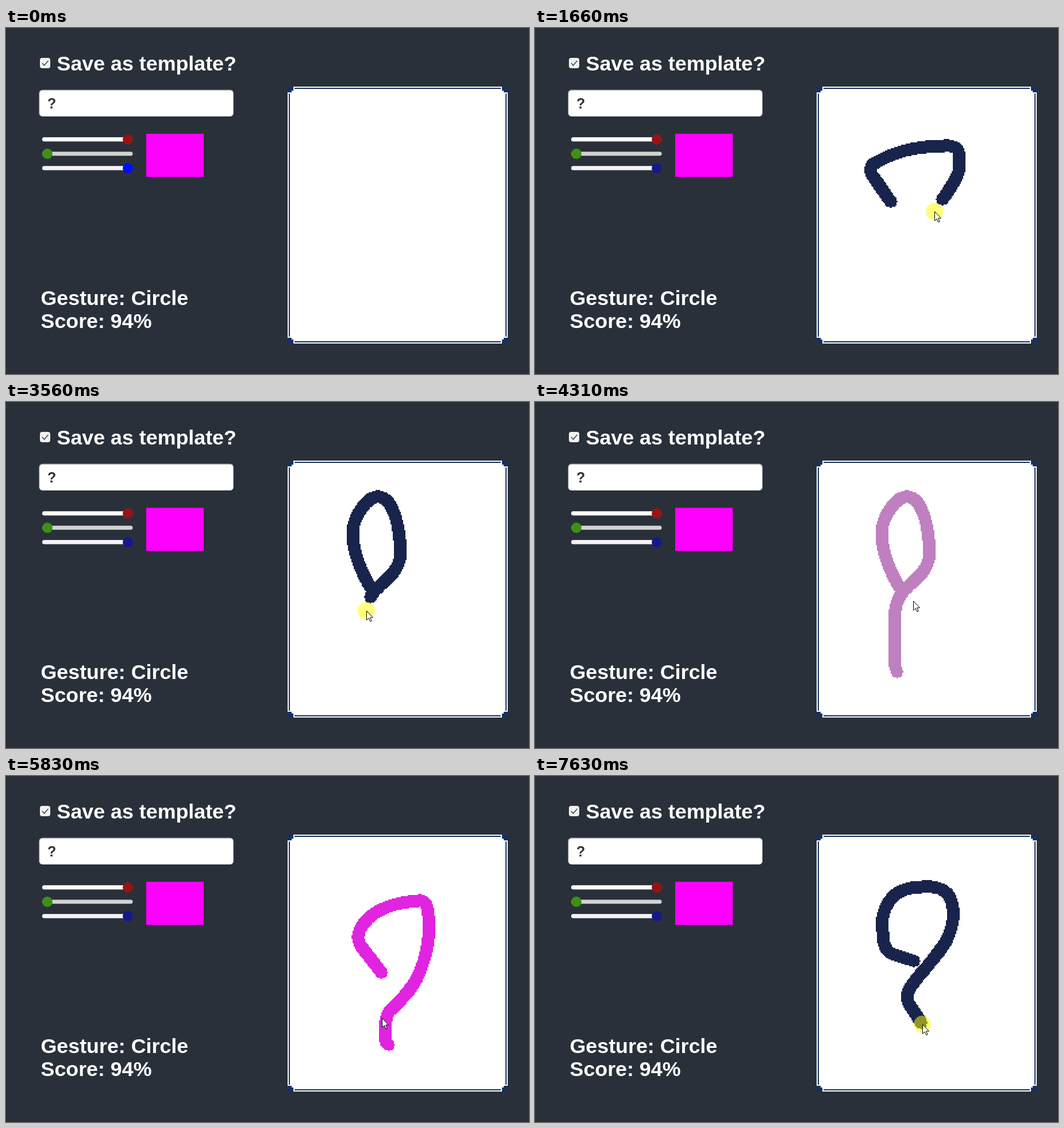
Animation, 910 px wide and 602 px high, one loop 8 s. Source, as an HTML page with a canvas:

```html
<!DOCTYPE html>
<html lang="en">
<head>
<meta charset="utf-8">
<title>Gesture drawing</title>
<style>
  html, body { margin: 0; width: 100%; height: 100%; overflow: hidden; background: #2a303a; }
  canvas { display: block; }
</style>
</head>
<body>
<canvas id="stage" width="910" height="602"></canvas>
<script>
const ctx = document.getElementById('stage').getContext('2d');
const LOOP = 8000, LAG = 45, FADE = 1000;
const FONT = '"Liberation Sans", Arial, sans-serif';
const NAVY = '#15315f', INK = '#19244d';

const clamp = v => Math.min(1, Math.max(0, v));
const smooth = u => u * u * (3 - 2 * u);
const pull = amount => u => u * (1 + amount * (1 - u));

// Points one pixel apart along an SVG path.
function sample(d) {
  const path = document.createElementNS('http://www.w3.org/2000/svg', 'path');
  path.setAttribute('d', d);
  return Array.from({ length: Math.ceil(path.getTotalLength()) + 1 }, (_, i) => path.getPointAtLength(i));
}

const move = (start, end, ease, d) => ({ start, end, ease, points: sample(d) });
const stroke = (press, release, ...args) => ({ press, release, ...move(...args) });

const strokes = [
  stroke(1120, 2137, 1140, 1960, pull(.46),
    'M619 302L588 258Q576 242 594 234Q640 206 712 205Q740 203 738 225V246Q738 256 712 294Q674 345 670 395Q669 415 679 434'),
  stroke(2860, 3810, 2890, 3775, pull(.2),
    'M633 320Q603 270 603 225Q604 205 622 181Q646 150 668 178Q686 210 686 264Q686 285 668 303L644 326Q626 345 626 375V450Q626 462 630 469'),
  stroke(4400, 5690, 4430, 5370, pull(.25),
    'M653 342L620 299Q604 280 624 255Q650 222 718 217Q731 215 734 235Q742 290 718 345Q705 375 668 408Q660 418 660 440V455Q660 463 665 467'),
  stroke(6420, LOOP, 6620, 7590, pull(-.29),
    'M660 322L626 311Q610 306 607 290Q605 275 604 258Q604 232 622 211Q640 192 680 193Q710 191 721 210Q737 243 715 288Q706 304 668 348L655 365Q641 384 653 400L674 432')
];
const glides = [
  move(80, 920, smooth, 'M842 554Q520 145 619 302'),
  move(2150, 2830, smooth, 'M679 434L633 320'),
  move(3830, 4380, smooth, 'M630 469Q746 412 653 342'),
  move(5700, 6050, smooth, 'M665 467Q640 395 660 322')
];
const moves = [...strokes, ...glides].sort((a, b) => a.start - b.start);

const reached = (m, t) =>
  Math.round(m.ease(clamp((t - m.start) / (m.end - m.start))) * (m.points.length - 1));

function rect(x, y, w, h, color, radius = 0) {
  ctx.fillStyle = color;
  ctx.beginPath();
  ctx.roundRect(x, y, w, h, radius);
  ctx.fill();
}

function disc(x, y, r, color) {
  ctx.fillStyle = color;
  ctx.beginPath();
  ctx.arc(x, y, r, 0, 7);
  ctx.fill();
}

function text(str, x, y, size = 35.8, color = '#fff') {
  ctx.font = `bold ${size}px ${FONT}`;
  ctx.fillStyle = color;
  ctx.fillText(str, x, y);
}

function slider(y, x, color, fill) {
  rect(63, y - 3.5, 157.5, 7, '#d2d2d2', 3.5);
  rect(63, y - 3.5, x - 63, 7, fill, 3.5);
  disc(x, y, 9, color);
}

// Panel-shaped box with square notches cut out of its corners.
function notched(inset, notch, color) {
  const x = 490 + inset, y = 102 + inset, w = 383 - 2 * inset, h = 447 - 2 * inset;
  rect(x + notch, y, w - 2 * notch, h, color);
  rect(x, y + notch, w, h - 2 * notch, color);
}

function drawPanel() {
  notched(0, 0, NAVY);
  notched(0, 10, '#fff');
  notched(2, 10, NAVY);
  notched(5, 0, NAVY);
  notched(4, 6, '#fff');
  notched(7, 0, '#fff');
}

function drawControls(t) {
  rect(59, 52, 18, 18, '#f1f1f1', 4);
  ctx.strokeStyle = '#444';
  ctx.lineWidth = 1.5;
  ctx.stroke(new Path2D('M63 61l3.5 4 7-8'));
  text('Save as template?', 88.5, 73.5);
  rect(57.5, 107.5, 338.5, 46.5, '#b9bbbe', 6);
  rect(58.5, 109, 336.5, 44.5, '#fff', 5);
  text('?', 72, 139.5, 25, '#323232');
  slider(193.8, 212, '#961414', '#fff');
  slider(218.8, 72, '#3c9114', '#d2d2d2');
  slider(243.8, 212, t < strokes[0].press ? '#000cff' : '#141a8c', '#f5f3f8');
  rect(244, 184, 100, 75, '#f0f');
  text('Gesture: Circle', 60.5, 482);
  text('Score: 94%', 60.5, 522);
}

// Blocky round brush, 11 cells of 2 px across.
function stamp({ x, y }) {
  const cx = Math.round(x / 2), cy = Math.round(y / 2);
  for (let j = -5; j <= 5; j++) {
    const w = Math.floor(Math.sqrt(25 - j * j));
    ctx.fillRect((cx - w) * 2 - 1, (cy + j) * 2 - 1, 4 * w + 2, 2);
  }
}

// Magenta moving to transparent black, over white.
function fadedInk(k) {
  const a = 1 - k, g = 255 * k, rb = g + 255 * a * a;
  return `rgb(${rb}, ${g}, ${rb})`;
}

function drawStroke(t) {
  const s = strokes.findLast(s => s.start <= t);
  if (!s || t - LAG < s.start) return;
  // The next press halts the fade until its own line begins.
  const next = strokes[strokes.indexOf(s) + 1];
  const faded = Math.min(t, next ? next.press : LOOP) - s.release;
  ctx.fillStyle = faded < 0 ? INK : fadedInk(clamp(faded / FADE));
  s.points.slice(0, reached(s, t - LAG) + 1).forEach(stamp);
}

const arrow = new Path2D('M.5 .5V16.5L4.3 13L6.8 18.8L9.2 17.8L6.7 12H11.5Z');

function drawPointer(t) {
  const current = moves.findLast(m => m.start <= t);
  if (!current) return;
  const { x, y } = current.points[reached(current, t)];
  if (strokes.some(s => s.press <= t && t < s.release)) disc(x, y, 15, 'rgba(255, 255, 0, .52)');
  ctx.save();
  ctx.translate(Math.round(x), Math.round(y));
  ctx.fillStyle = '#fff';
  ctx.fill(arrow);
  ctx.strokeStyle = '#000';
  ctx.lineWidth = 1;
  ctx.stroke(arrow);
  ctx.restore();
}

function frame() {
  const t = performance.now() % LOOP;
  rect(0, 0, 910, 602, '#2a303a');
  drawControls(t);
  drawPanel();
  drawStroke(t);
  drawPointer(t);
  requestAnimationFrame(frame);
}
frame();
</script>
</body>
</html>
```
